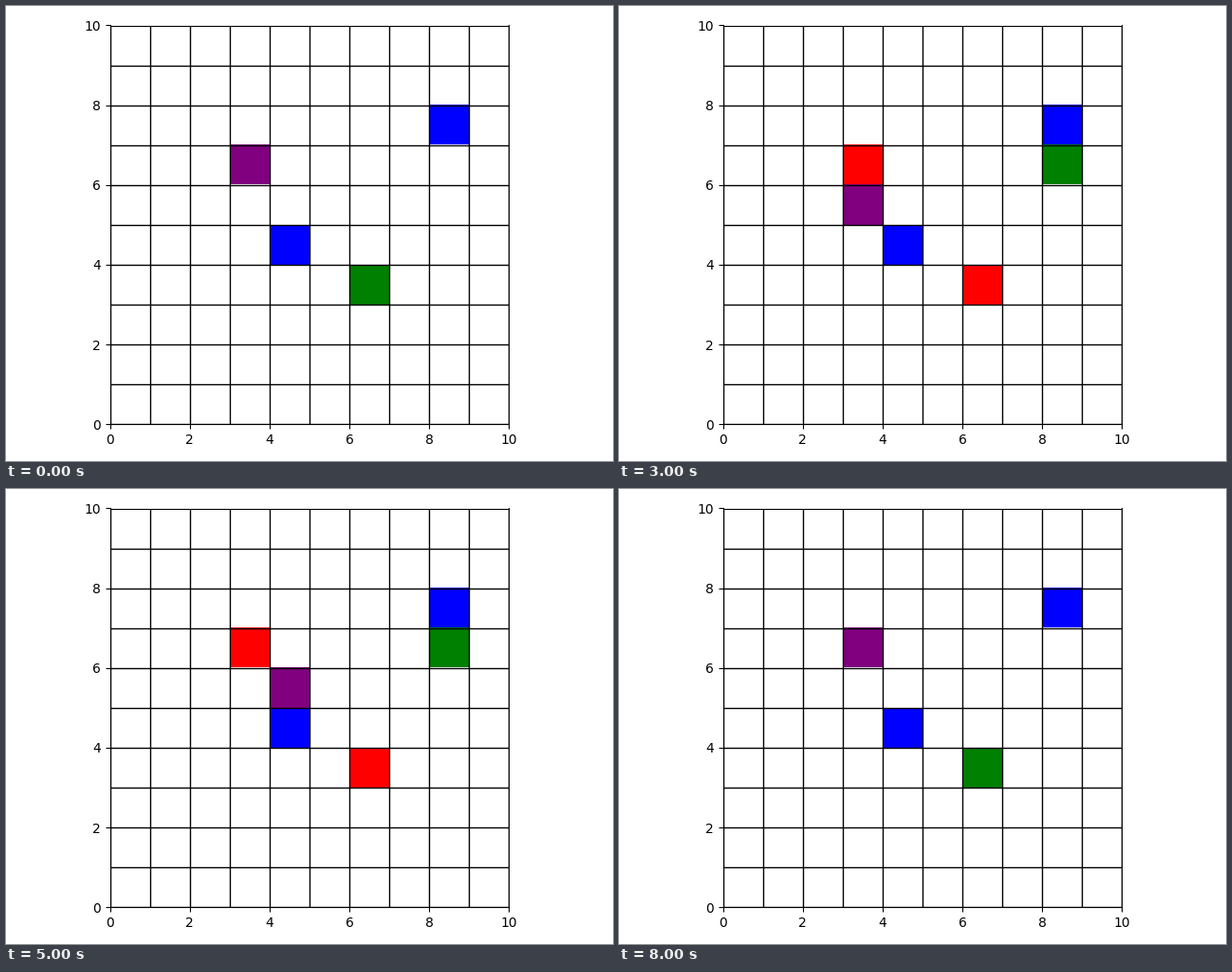
A matplotlib script for the animation above (9 s loop, 640x480 px).

```python
import matplotlib.pyplot as plt
import numpy as np
from matplotlib.animation import FuncAnimation
from matplotlib.colors import ListedColormap

SIZE = 10
WHITE, RED, BLUE, PURPLE, GREEN = range(5)
CMAP = ListedColormap(["white", "red", "blue", "purple", "green"])


def walk(*stops):
    """Visit the stops one cell per step, diagonally first, then straight."""
    path = [np.array(stops[0])]
    for stop in stops[1:]:
        while (path[-1] != stop).any():
            path.append(path[-1] + np.sign(stop - path[-1]))
    return path


home_a, goal_a = (3, 6), (4, 4)
home_b, goal_b = (6, 3), (8, 7)

purple_path = walk(home_a, goal_a, home_a, goal_a, (4, 5), home_a)
green_path = walk(home_b, goal_b, (8, 6), (7, 4), home_b)


def board(step):
    cells = np.full((SIZE, SIZE), WHITE)
    for (x, y), color in ((home_a, RED), (home_b, RED),
                          (goal_a, BLUE), (goal_b, BLUE),
                          (purple_path[step], PURPLE),
                          (green_path[step], GREEN)):
        cells[y, x] = color
    return cells


fig, ax = plt.subplots(figsize=(6.4, 4.8), dpi=100)
image = ax.imshow(board(0), cmap=CMAP, vmin=WHITE, vmax=GREEN,
                  origin="lower", extent=(0, SIZE, 0, SIZE),
                  interpolation="nearest")

for i in range(SIZE + 1):
    ax.plot([i, i], [0, SIZE], color="black", lw=1)
    ax.plot([0, SIZE], [i, i], color="black", lw=1)
ax.set_xlim(0, SIZE)
ax.set_ylim(0, SIZE)
fig.tight_layout()


def update(step):
    image.set_data(board(step))
    return [image]


anim = FuncAnimation(fig, update, frames=len(purple_path), interval=1000,
                     repeat=True, repeat_delay=0)
plt.show()
```
